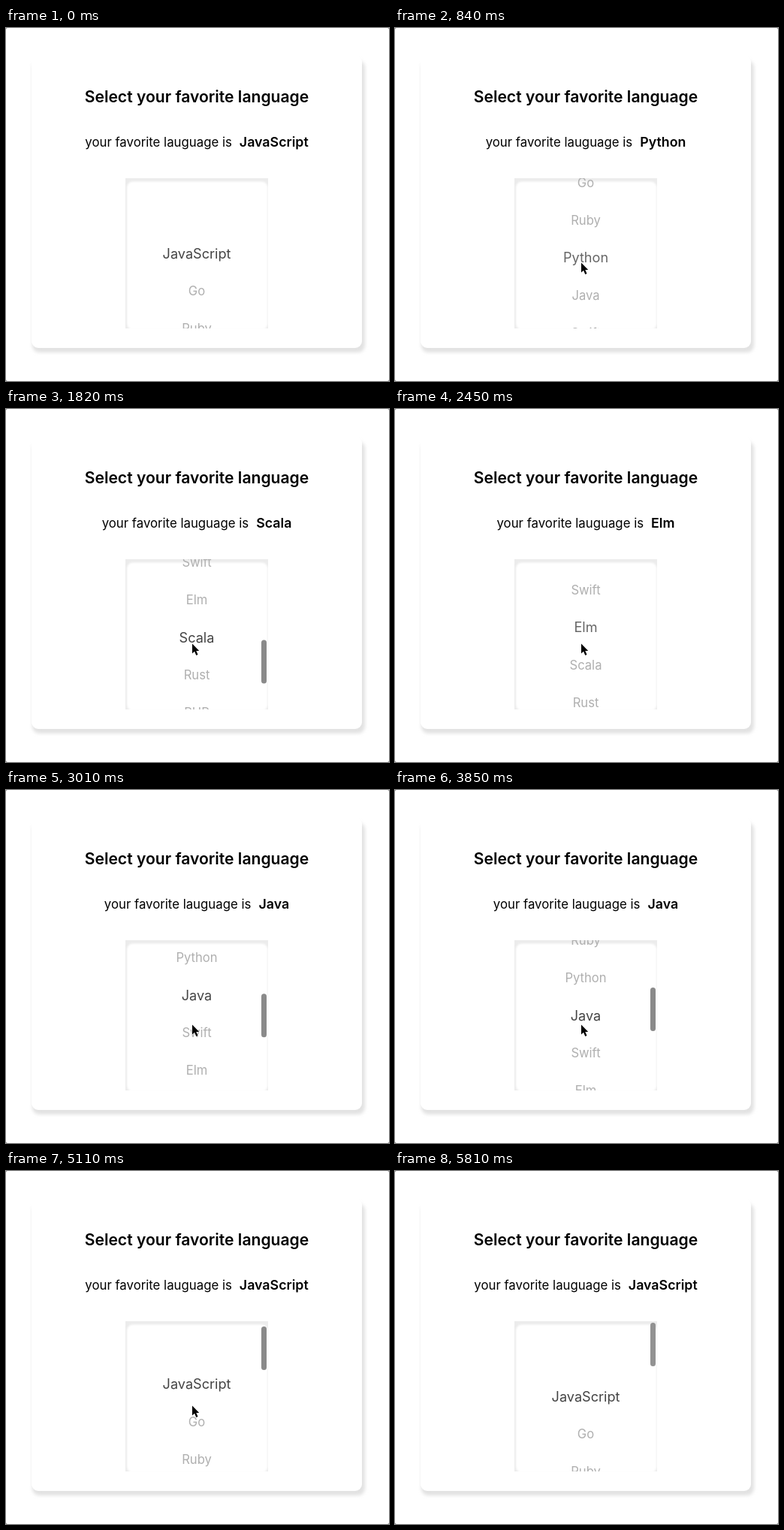
Write an HTML page that moves like this. It is 510 px wide and 470 px high and loops after 5.88 s.

```html
<!DOCTYPE html>
<html lang="en">
<head>
<meta charset="utf-8">
<title>Language picker</title>
<style>
  html, body { margin: 0; width: 100%; height: 100%; overflow: hidden; background: #777; }
  svg { display: block; width: 510px; height: 470px; font: 16.8px Inter, "Open Sans", sans-serif; }
  text { text-anchor: middle; }
  .bold { font-weight: 600; }
</style>
</head>
<body>
<svg viewBox="0 0 510 470">
  <defs>
    <filter id="soft" x="-10%" y="-10%" width="120%" height="120%"><feGaussianBlur stdDeviation="2"/></filter>
    <filter id="edge"><feGaussianBlur stdDeviation="1"/></filter>
    <clipPath id="view"><rect x="159" y="200" width="190" height="200"/></clipPath>
  </defs>
  <rect width="510" height="470" rx="2" fill="#fff"/>
  <rect x="35" y="43" width="443" height="389" rx="9" fill="#e2e2e2" filter="url(#soft)"/>
  <rect x="34" y="36" width="440" height="390" rx="9" fill="#fff"/>
  <text class="bold" x="254" y="99" font-size="21.1">Select your favorite language</text>
  <text x="254" y="158.4">your favorite lauguage is<tspan id="choice" class="bold" dx="10" font-size="17.8"></tspan></text>
  <g clip-path="url(#view)">
    <rect x="159" y="200" width="190" height="200" fill="#ececec"/>
    <rect x="161" y="204.5" width="187.5" height="197" rx="8" fill="#fff" filter="url(#edge)"/>
    <g id="list"></g>
    <rect id="bar" x="340" width="7" height="58" rx="3.5" fill="#8a8a8a"/>
  </g>
  <path id="cursor" d="M0 0V13L3 10.3L5.3 15.6L7.5 14.6L5.3 9.4H9.2Z" stroke="#fff" paint-order="stroke"/>
</svg>
<script>
const LOOP = 5880, STEP = 70, ROW = 50;
const names = ["JavaScript", "Go", "Ruby", "Python", "Java", "Swift", "Elm", "Scala", "Rust", "PHP"];

// A flick slows down to `to`, later snaps to a row, then its scrollbar fades out at `hide`.
const flicks = [
  { start: 630, stop: 1540, to: 342, power: 2.1, snap: 1750, hide: 2310 },
  { start: 2365, stop: 3010, to: 227, power: 2.8, snap: 3290, hide: 3850 },
  { start: 3970, stop: 4690, to: 33, power: 4, snap: 5040, hide: 5800 }
];

const $ = id => document.getElementById(id);
const choice = $("choice"), bar = $("bar"), cursor = $("cursor");
const rows = names.map(name => {
  const row = document.createElementNS("http://www.w3.org/2000/svg", "text");
  row.textContent = name;
  row.setAttribute("x", 254);
  return $("list").appendChild(row);
});

const progress = (t, from, to) => Math.max(0, Math.min(1, (t - from) / (to - from)));
const rowAt = offset => Math.floor((offset + 10) / ROW);

function scrollAt(t) {
  let rest = 0, offset = 0, alpha = 0;
  for (const { start, stop, to, power, snap, hide } of flicks) {
    if (t < start) break;
    const from = rest;
    rest = rowAt(to) * ROW;
    offset = to + (from - to) * (1 - progress(t, start, stop)) ** power
      + (rest - to) * progress(t, snap, snap + 140);
    alpha = t < start + 250 ? 0 : 1 - progress(t, hide, hide + 140);
  }
  return { offset, alpha };
}

function cursorAt(t) {
  const away = (1 - progress(t, 70, 350)) ** 1.6;
  const leave = progress(t, 5320, 5670) ** 1.5;
  return [248 + 138 * away + 20 * leave, 312.5 + 72 * away + 165 * leave];
}

function draw(t) {
  const { offset, alpha } = scrollAt(t);
  const now = rowAt(offset), before = rowAt(scrollAt(t - STEP).offset);
  choice.textContent = names[now];
  rows.forEach((row, i) => {
    const size = i === now ? 18.1 : 16.6;
    row.setAttribute("y", 300.4 + i * ROW - offset + size * 0.36);
    row.setAttribute("font-size", size);
    row.setAttribute("fill", i !== now ? "#afafaf" : now === before ? "#444" : "#666");
  });
  bar.setAttribute("y", 202 + offset * 0.305);
  bar.setAttribute("opacity", alpha);
  cursor.setAttribute("transform", `translate(${cursorAt(t)})`);
  cursor.setAttribute("visibility", t >= 70 && t < 5670 ? "visible" : "hidden");
}

const begin = performance.now();
function tick() {
  const t = (performance.now() - begin) % LOOP;
  draw(Math.floor(t / STEP) * STEP);
  requestAnimationFrame(tick);
}
tick();
</script>
</body>
</html>
```
